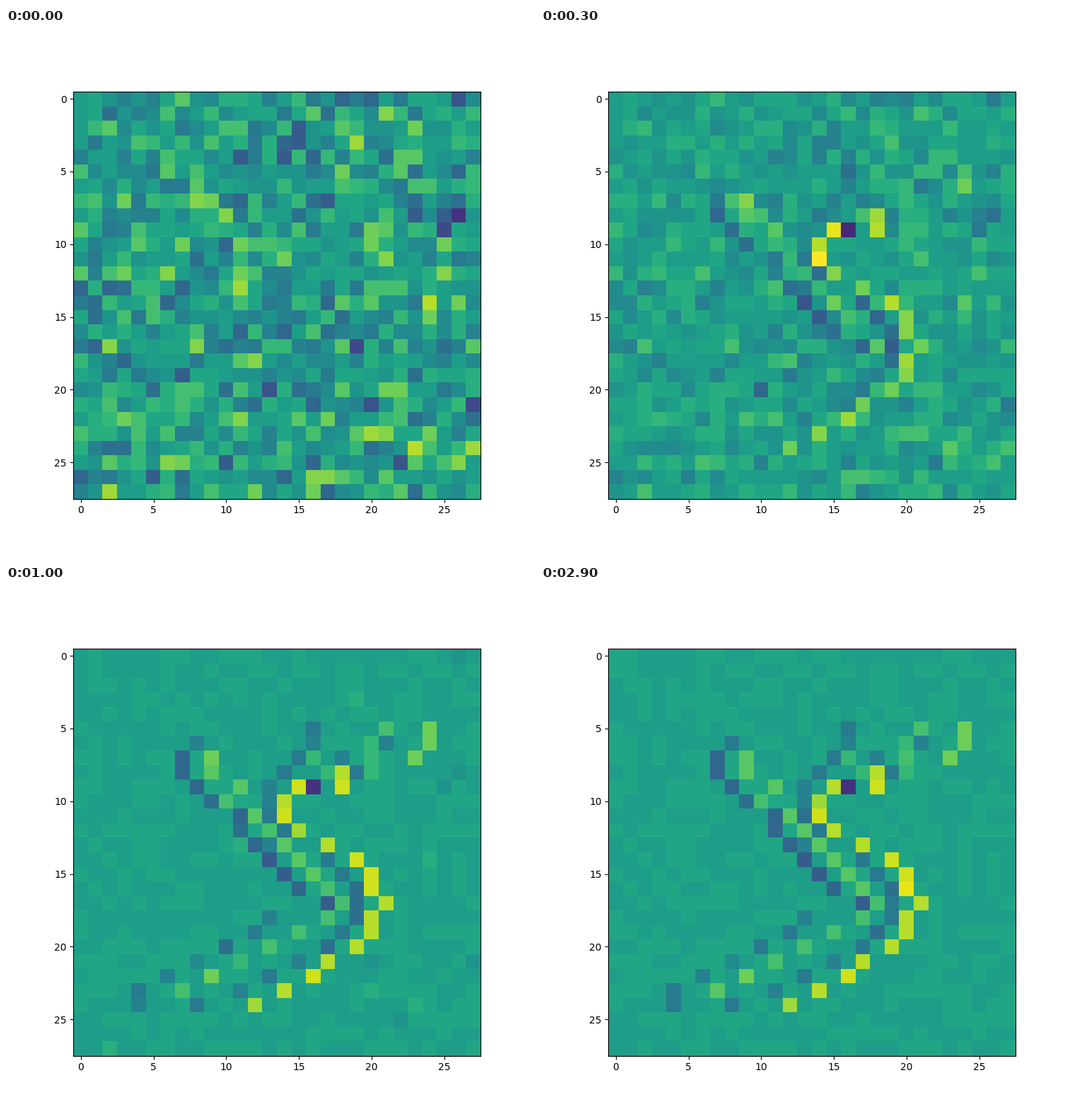
A matplotlib script for the animation above (4340 ms loop, 748x748 px).

```python
import numpy as np
import matplotlib.pyplot as plt
from matplotlib.animation import FuncAnimation

N = 28
STEP = 20            # ms per drawn frame
LOOP = 4340
BASE = 0.572         # resting level of the map
HOLDS = [14, 21, 22, 29]

rng = np.random.default_rng(7)
noise = rng.normal(-0.005, 0.125, (N, N))
signal = np.zeros((N, N))


def stroke(level, *points):
    """Polyline drawn with one cell per row, its level varying slightly."""
    xs, ys = zip(*points)
    rows = np.arange(ys[0], ys[-1] + 1)
    cols = np.round(np.interp(rows, ys, xs)).astype(int)
    signal[rows, cols] = level - BASE + rng.normal(0, 0.025, len(rows))


# bright strokes
stroke(.90, (15, 9), (14, 11), (15, 12), (19, 14), (21, 17), (20, 19), (16, 22), (12, 24))
stroke(.72, (9, 7), (9, 8), (11, 9), (10, 10), (12, 11), (18, 17), (17, 18), (15, 19), (7, 23))
stroke(.79, (24, 5), (24, 6), (23, 7))
stroke(.68, (21, 5), (20, 6), (20, 8))
stroke(.66, (16, 7), (17, 8))
stroke(.89, (18, 8), (18, 9))

# dark strokes
stroke(.35, (8, 6), (7, 7), (7, 8), (9, 10), (11, 11), (11, 12), (15, 16), (17, 17))
stroke(.43, (15, 7), (13, 9), (13, 11), (14, 12), (13, 13))
stroke(.42, (17, 14), (19, 16), (19, 18), (17, 20), (11, 23), (8, 24))
stroke(.42, (13, 18), (12, 19), (6, 22), (4, 23), (4, 24))
stroke(.43, (21, 6), (18, 7), (19, 8))
stroke(.47, (16, 5), (16, 6))
stroke(.17, (16, 9))

# cells near the upper middle settle first
yy, xx = np.mgrid[:N, :N]
lead = 0.9 * np.exp(-((xx - 14) ** 2 + (yy - 9.5) ** 2) / 30)


def field(k):
    fade = 0.05 + 0.95 * np.exp(-k / 4)
    grow = 1 - np.exp(-k / 2)
    return np.clip(BASE + fade * noise + signal * grow ** (1 - lead), 0, 1)


def step_at(ms):
    k = ms // 100
    return k if k < HOLDS[0] else max(h for h in HOLDS if h <= k)


fig, ax = plt.subplots(figsize=(7.48, 7.48), dpi=100)
image = ax.imshow(field(0), cmap=plt.get_cmap("viridis", N), vmin=0, vmax=1,
                  interpolation="nearest")


def draw(i):
    image.set_data(field(step_at(i * STEP)))
    return [image]


anim = FuncAnimation(fig, draw, frames=LOOP // STEP, interval=STEP,
                     repeat=True, repeat_delay=0)
plt.show()
```
